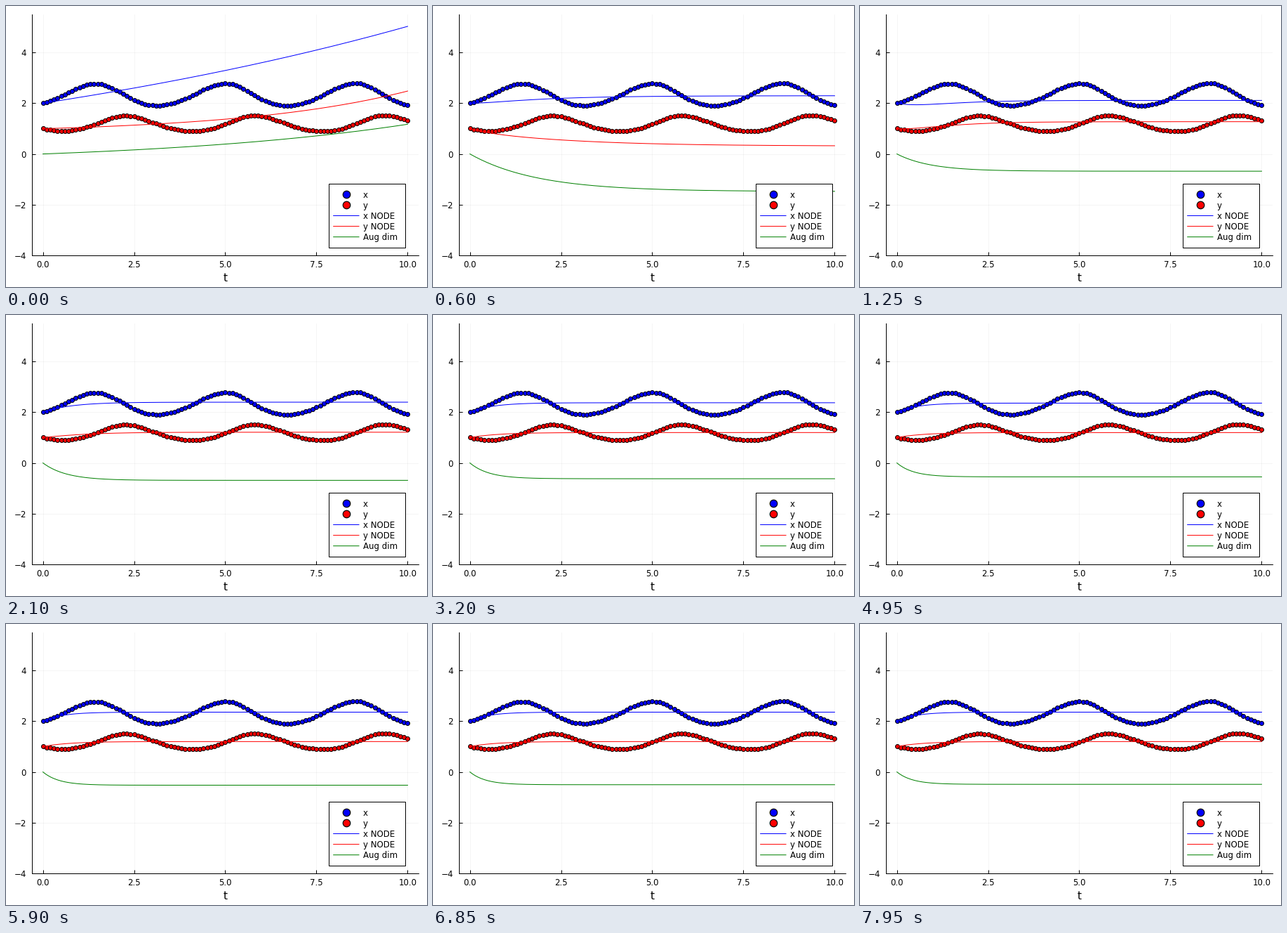
Animation, 600 px wide and 400 px high, one loop 8 s. Source, as a matplotlib script:

```python
import numpy as np
import matplotlib.pyplot as plt
from matplotlib.animation import FuncAnimation
from matplotlib.patches import Rectangle

W, H, DPI = 600, 400, 100
FRAMES, STEP_MS = 160, 50
PX = 72 / DPI
FONT = 11.8 * PX

plt.rcParams["font.family"] = "DejaVu Sans"


def lotka(n=101, span=10.0, sub=10):
    """Predator-prey orbit from (2, 1), sampled at n even times."""
    a, c, xs, ys, grow = 1.295, 2.43, 2.31, 1.18, 0.006

    def rate(p):
        x, y = p
        return np.array([x * (a * (1 - y / ys) + grow * (x - xs)),
                         c * y * (x / xs - 1)])

    h = span / (n - 1) / sub
    p, out = np.array([2.0, 1.0]), []
    for i in range((n - 1) * sub + 1):
        if i % sub == 0:
            out.append(p)
        k1 = rate(p)
        k2 = rate(p + h / 2 * k1)
        k3 = rate(p + h / 2 * k2)
        k4 = rate(p + h * k3)
        p = p + h / 6 * (k1 + 2 * k2 + 2 * k3 + k4)
    return np.array(out).T


def swing(n, amp, decay, turn, phase):
    """Damped oscillation over training steps, angles in degrees."""
    return amp * np.exp(-n / decay) * np.cos(np.radians(turn * n + phase))


def settle(n, first, last, decay):
    return last + (first - last) * np.exp(-n / decay)


def bump(n, height, centre, width):
    return height * np.exp(-((n - centre) / width) ** 2)


def path(t, start, end, k, bend=0.0):
    """Exponential approach that has moved by end at t = 10."""
    k += 1e-9
    return (start + end * np.expm1(-k * t) / np.expm1(-10 * k)
            + bend * t * np.exp(-1.3 * t))


def x_curve(t, n):
    end = .355 + swing(n, 3.65, 12.4, 11.3, -43)
    return path(t, 2, end, settle(n, -.06, 2, 40), bump(n, -.5, 21, 8))


def y_curve(t, n):
    end = .197 + swing(n, 2.56, 11.4, 9, 60)
    return path(t, 1, end, settle(n, -.22, 1.4, 25), bump(n, -.3, 25, 15))


def aug_curve(t, n):
    end = settle(n, -.93, -.45, 62) + swing(n, 7.18, 7, 14, 73)
    return path(t, 0, end, settle(n, -.14, 2.4, 38))


fig = plt.figure(figsize=(W / DPI, H / DPI), dpi=DPI, facecolor="white")
L, R, T, B = 37, 588, 11.8, 355.2
ax = fig.add_axes([L / W, 1 - B / H, (R - L) / W, (B - T) / H])
ax.set(xlim=(-.3, 10.3), ylim=(-4, 5.5))
ax.set_xticks(np.arange(0, 10.1, 2.5))
ax.set_yticks(range(-4, 5, 2))
ax.set_axisbelow(True)
ax.grid(color="black", alpha=.06, lw=.5)
ax.spines[["top", "right"]].set_visible(False)
for side in ("left", "bottom"):
    ax.spines[side].set_linewidth(PX)
ax.tick_params(direction="in", length=5 * PX, width=PX, labelsize=FONT)
ax.tick_params(axis="x", pad=7.3 * PX)
ax.tick_params(axis="y", pad=8 * PX)
fig.text(312.5 / W, 1 - 392 / H, "t", size=15.3 * PX, ha="center", va="baseline")

DOT = dict(ls="", marker="o", mec="black", snap=False)
ts = np.linspace(0, 10, 101)
for data, color in zip(lotka(), ("blue", "red")):
    ax.plot(ts, data, mfc=color, ms=6 * PX, mew=PX, zorder=3, **DOT)

tt = np.linspace(0, 10, 201)
CURVES = {"blue": x_curve, "red": y_curve, "green": aug_curve}
lines = [ax.plot([], [], color=c, lw=PX, zorder=4)[0] for c in CURVES]

# Legend, laid out in pixels.
key = fig.add_axes([0, 0, 1, 1], zorder=5)
key.set(xlim=(0, W), ylim=(H, 0))
key.axis("off")
key.add_patch(Rectangle((460, 253), 109.2, 91.2, fc="white", ec="black", lw=PX))
ENTRIES = [("x", "blue", True), ("y", "red", True), ("x NODE", "blue", False),
           ("y NODE", "red", False), ("Aug dim", "green", False)]
for i, (label, color, dot) in enumerate(ENTRIES):
    y = 268.3 + 15.1 * i
    if dot:
        key.plot(484.7, y, mfc=color, ms=10.5 * PX, mew=1.2 * PX, **DOT)
    else:
        key.plot([466.7, 503], [y, y], color=color, lw=PX, snap=False)
    key.text(509, y + 4.3, label, size=FONT, va="baseline")


def update(frame):
    for line, curve in zip(lines, CURVES.values()):
        line.set_data(tt, curve(tt, frame))
    return lines


anim = FuncAnimation(fig, update, frames=FRAMES, interval=STEP_MS,
                     repeat=True, repeat_delay=0, blit=False)
plt.show()
```
